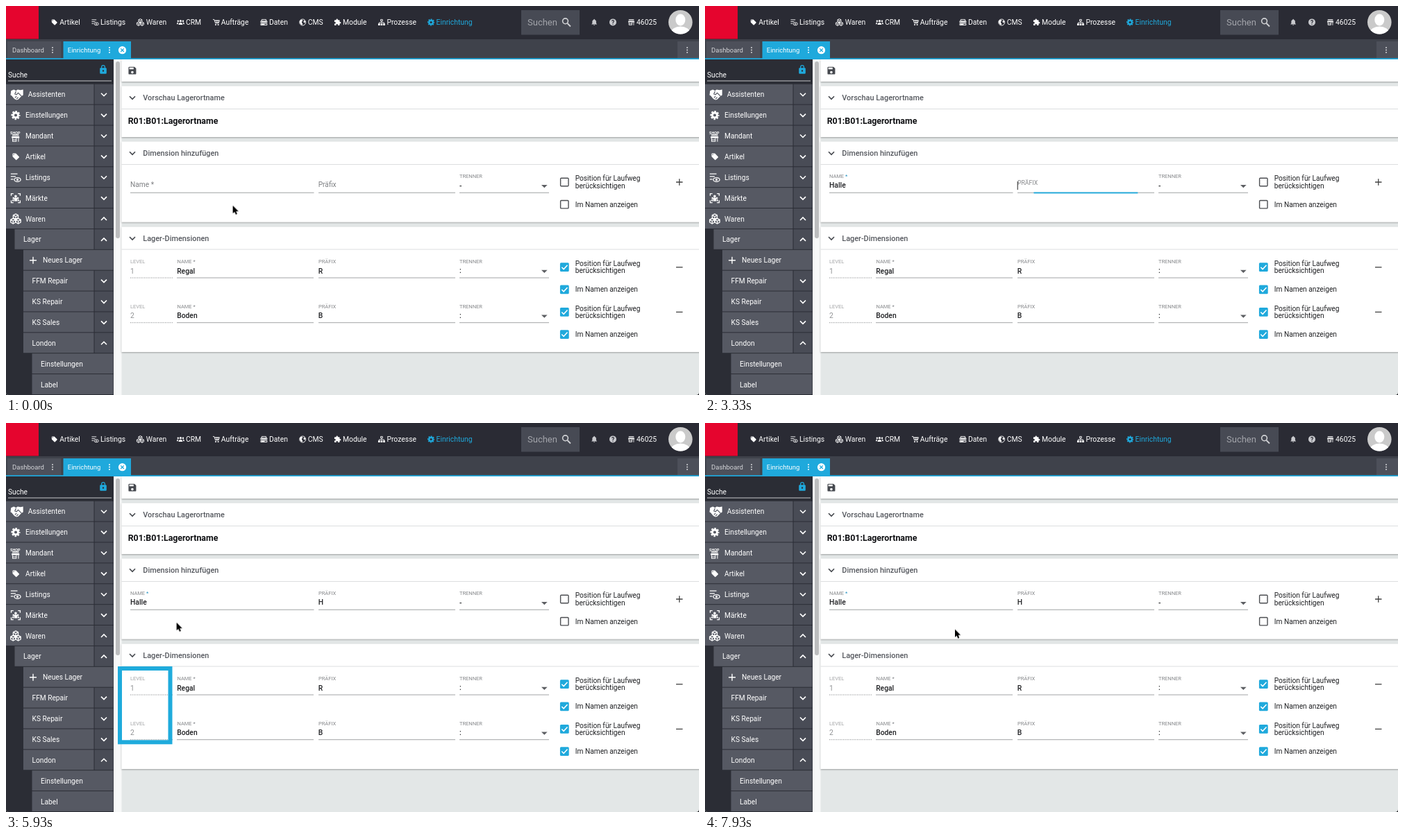
An HTML page that plays this animation: 998 by 561 pixels, repeating every 8000 ms.

```html
<!DOCTYPE html>
<html lang="de">
<head>
<meta charset="utf-8">
<title>Lager-Dimensionen</title>
<style>
html, body { margin: 0; width: 100%; height: 100%; overflow: hidden; background: #17181c; }
svg { position: absolute; left: 0; top: 0; display: block; }
#page { border-radius: 0 0 4px 4px; }
svg, .typed { font: 10.2px Roboto, sans-serif; }
.nav { font-size: 10.4px; fill: #fff; }
.tab { font-size: 9.5px; }
.title { font-size: 10.9px; font-weight: 500; fill: #55585e; }
.label { font-size: 7.5px; fill: #85878a; }
.hint { fill: #7d7f82; }
.value, .typed { font-size: 10.3px; font-weight: 500; }
.value, .opt { fill: #1f2023; }
.stroke { fill: none; stroke: currentColor; stroke-width: 2; }
.typed { position: absolute; top: 253px; height: 13px; line-height: 12px; overflow: hidden; white-space: nowrap; color: #1f2023; }

/* one loop is 8 s, so 1% is 80 ms */
.typed, .anim { animation: 8s linear infinite; }
.step { animation-timing-function: step-end; }
.label.anim { transform-box: fill-box; transform-origin: 0 50%; }
.line { fill: #1fa9dc; transform-box: fill-box; transform-origin: 50% 50%; }

.name-hint { animation-name: name-hint; }
.name-label { animation-name: name-label; }
.name-line { animation-name: name-line; }
.name-text { left: 179px; animation-name: name-text; animation-timing-function: step-end; }
.name-caret { animation-name: name-caret; }
.prefix-hint { animation-name: prefix-hint; }
.prefix-label { animation-name: prefix-label; }
.prefix-line { animation-name: prefix-line; }
.prefix-text { left: 449.7px; animation-name: prefix-text; animation-timing-function: step-end; }
.prefix-caret { animation-name: prefix-caret; }
.pointer { animation-name: pointer; }
.arrow { animation-name: arrow; }
.beam { animation-name: beam; }
.mark { animation-name: mark; }

@keyframes name-hint { 0% { opacity: 1 } 21.625%, to { opacity: 0 } }
@keyframes name-label {
  0%, 21.62% { opacity: 0; transform: translateY(10px) scale(1.16) }
  21.625% { opacity: 1; transform: translateY(10px) scale(1.16); fill: #85878a; animation-timing-function: ease-out }
  25.9%, 41.62% { opacity: 1; transform: none; fill: #5c8ea8 }
  41.625%, to { opacity: 1; transform: none; fill: #85878a }
}
@keyframes name-line {
  0%, 21.62% { transform: scaleX(0) }
  21.625% { transform: scaleX(.76) }
  23.4%, 41.62% { transform: none }
  41.625%, to { transform: scaleX(0) }
}
@keyframes name-text {
  0% { width: 0 }
  28.375% { width: 7.4px }
  30% { width: 13px }
  32.5% { width: 15.6px }
  33.375% { width: 18.2px }
  34.125%, to { width: 30px }
}
@keyframes name-caret {
  0% { opacity: 0; transform: none }
  21.625% { opacity: 1; transform: none }
  28.375% { opacity: 1; transform: translateX(7px) }
  30% { opacity: 1; transform: translateX(12.8px) }
  32.5% { opacity: 1; transform: translateX(15.4px) }
  33.375% { opacity: 1; transform: translateX(18px) }
  34.125% { opacity: 1; transform: translateX(23.3px) }
  39.125%, to { opacity: 0; transform: none }
}
@keyframes prefix-hint { 0% { opacity: 1 } 41.625%, to { opacity: 0 } }
@keyframes prefix-label {
  0%, 41.62% { opacity: 0; transform: translateY(9.7px) scale(1.16) }
  41.625% { opacity: 1; transform: translateY(9.7px) scale(1.16); fill: #85878a; animation-timing-function: ease-out }
  45.9%, 60.87% { opacity: 1; transform: none; fill: #5c8ea8 }
  60.875%, to { opacity: 1; transform: none; fill: #85878a }
}
@keyframes prefix-line {
  0%, 41.62% { transform: scaleX(0) }
  41.625% { transform: scaleX(.76) }
  43.4%, 60.87% { transform: none }
  60.875%, to { transform: scaleX(0) }
}
@keyframes prefix-text { 0% { width: 0 } 47.5%, to { width: 12px } }
@keyframes prefix-caret {
  0% { opacity: 0; transform: none }
  41.625% { opacity: 1; transform: none }
  47.5% { opacity: 1; transform: translateX(7.2px) }
  54.125%, to { opacity: 0; transform: none }
}
@keyframes pointer {
  0%, 4.2% { transform: translate(326.6px, 287.8px); animation-timing-function: ease-in-out }
  15% { transform: translate(251px, 264px); animation-timing-function: ease-out }
  17.5%, 51% { transform: translate(246px, 259.3px); animation-timing-function: ease-in-out }
  59.125%, 95% { transform: translate(245.6px, 287.8px); animation-timing-function: ease-in }
  99.125%, to { transform: translate(360px, 297.6px) }
}
@keyframes arrow { 0% { opacity: 1 } 15.875% { opacity: 0 } 55%, to { opacity: 1 } }
@keyframes beam {
  0% { opacity: 0 }
  15.875% { opacity: 1 }
  28.375% { opacity: 0 }
  51.625% { opacity: 1 }
  55%, to { opacity: 0 }
}
@keyframes mark {
  0%, 67.5% { opacity: 0 }
  74.125%, 87.5% { opacity: 1 }
  94.125%, to { opacity: 0 }
}
</style>
</head>
<body>
<svg id="page" width="998" height="561" viewBox="0 0 998 561">
  <defs>
    <filter id="shadow" x="-2%" y="-10%" width="104%" height="130%">
      <feDropShadow dx="0" dy="1" stdDeviation="1" flood-opacity=".32"/>
    </filter>
    <!-- icons on a 24 unit grid -->
    <path id="tag" fill-rule="evenodd" d="M21.4 11.6l-9-9C12 2.2 11.5 2 11 2H4a2 2 0 0 0-2 2v7c0 .5.2 1 .6 1.4l9 9c.8.8 2 .8 2.8 0l7-7c.8-.8.8-2 0-2.8zM5.5 7a1.5 1.5 0 1 1 0-3 1.5 1.5 0 0 1 0 3z"/>
    <g id="gear" fill="none" stroke="currentColor">
      <circle cx="12" cy="12" r="6" stroke-width="5"/>
      <circle cx="12" cy="12" r="9.3" stroke-width="4" stroke-dasharray="4.3 3" stroke-dashoffset="2.1"/>
    </g>
    <g id="list" class="stroke">
      <path d="M1 4h15M1 10h11M1 16h6"/>
      <ellipse cx="16" cy="17" rx="7" ry="4.5"/><circle cx="16" cy="17" r="1.4"/>
    </g>
    <path id="cube" class="stroke" d="M0-6l5.5 2.7v6L0 6l-5.5-3.3v-6zM-5.5-3.3L0 0l5.5-3.3M0 0v6"/>
    <g id="cubes"><use href="#cube" x="12" y="7"/><use href="#cube" x="6.3" y="17"/><use href="#cube" x="17.7" y="17"/></g>
    <g id="people">
      <circle cx="12" cy="8" r="3.6"/><circle cx="4" cy="8" r="2.7"/><circle cx="20" cy="8" r="2.7"/>
      <path d="M5.5 20c0-9 13-9 13 0zM0 18c0-6 3-6 5.5-5-2 2-2 3-2 5zM24 18c0-6-3-6-5.500-5 2 2 2 3 2 5z"/>
    </g>
    <g id="cart">
      <path class="stroke" d="M1 3h4l4 12h10l3-9H6M9 8h11M10 12h9"/>
      <circle cx="10" cy="20" r="2.2"/><circle cx="18" cy="20" r="2.2"/>
    </g>
    <g id="data"><path class="stroke" d="M5 8V3h14v5M2 8h20v5H2zM2 16h20v5H2z"/><path d="M4 9h16v3H4zM4 17h10v3H4z"/></g>
    <g id="globe"><circle class="stroke" cx="12" cy="12" r="10"/><path d="M3 7c5-6 9-3 9 0s-4 2-3 5 4 3 2 8C5 20 2 13 3 7zM16 5l5 5-3 5-3-4z"/></g>
    <path id="puzzle" d="M20.500 11H19V7a2 2 0 0 0-2-2h-4V3.500a2.500 2.500 0 0 0-5 0V5H4a2 2 0 0 0-2 2v3.800h1.500a2.700 2.700 0 0 1 0 5.400H2V20a2 2 0 0 0 2 2h3.800v-1.500a2.700 2.700 0 0 1 5.400 0V22H17a2 2 0 0 0 2-2v-4h1.500a2.500 2.500 0 0 0 0-5z"/>
    <g id="flow"><path class="stroke" d="M12 8v5M4 17v-4h16v4M9 3h6v5H9z"/><path d="M1 16h6v6H1zM9 16h6v6H9zM17 16h6v6h-6z"/></g>
    <g id="shop"><path d="M3 2h18v3H3zM2 7h20l1 5H1z"/><path class="stroke" d="M4 12v9h10v-9M20 12v10M4 17h10"/></g>
    <g id="people-box">
      <path class="stroke" d="M2 7V2h5M17 2h5v5M22 17v5h-5M7 22H2v-5"/>
      <circle cx="12" cy="7.500" r="2.800"/><circle cx="7" cy="12" r="2"/><circle cx="17" cy="12" r="2"/>
      <path d="M8.500 19v-6c0-3 7-3 7 0v6zM4.500 19c0-5 2-5 3-4v4zM19.500 19c0-5-2-5-3-4v4z"/>
    </g>
    <g id="hands">
      <path d="M1 5l5-2 4 2 3-2 5 1 5-1v10l-3 2-6 6-3 1-4-2-5-6-2-1z"/>
      <path d="M10 6l-2 5 3 1 3-3 6 6M8 18l3-3M11 20l3-3" fill="none" stroke="#565963" stroke-width="1.500"/>
    </g>
    <path id="save" fill-rule="evenodd" d="M17 3H5a2 2 0 0 0-2 2v14a2 2 0 0 0 2 2h14a2 2 0 0 0 2-2V7zM12 19a3 3 0 1 1 0-6 3 3 0 0 1 0 6zm3-10H5V5h10z"/>
    <path id="bell" d="M12 22a2 2 0 0 0 2-2h-4a2 2 0 0 0 2 2zm6-6v-5c0-3-1.600-5.600-4.500-6.300V4a1.500 1.500 0 0 0-3 0v.7C7.600 5.400 6 8 6 11v5l-2 2v1h16v-1z"/>
    <path id="lock" fill-rule="evenodd" d="M18 8h-1V6A5 5 0 0 0 7 6v2H6a2 2 0 0 0-2 2v10a2 2 0 0 0 2 2h12a2 2 0 0 0 2-2V10a2 2 0 0 0-2-2zm-6 9a2 2 0 1 1 0-4 2 2 0 0 1 0 4zm3-9H9V6a3 3 0 0 1 6 0z"/>
    <!-- small parts around their own centre -->
    <path id="down" fill="none" stroke="currentColor" stroke-width="1.600" d="M-4-2L0 2l4-4"/>
    <path id="up" fill="none" stroke="currentColor" stroke-width="1.600" d="M-4 2L0-2l4 4"/>
    <g id="dots" fill="currentColor"><circle cy="-3.600" r="1"/><circle r="1"/><circle cy="3.600" r="1"/></g>
    <rect id="box" x="-5.700" y="-5.700" width="11.400" height="11.400" rx="1" fill="#fff" stroke="#4c4e52" stroke-width="1.400"/>
    <g id="checked"><rect x="-6.400" y="-6.400" width="12.800" height="12.800" rx="1.500" fill="#1fa9dc"/><path d="M-4 0l2.800 2.900L4.200-3" fill="none" stroke="#fff" stroke-width="1.500"/></g>
    <!-- parts shared by every form row; y counts from the label centre -->
    <g id="options">
      <text class="label" x="653" y="2.700">TRENNER</text>
      <path d="M450 23.800h197M653 23.800h129" stroke="#a2a4a6"/>
      <path d="M771 12.500h8.600l-4.300 4.300z" fill="#5d5f63"/>
      <g class="opt"><text x="819.700" y="6.800">Position für Laufweg</text><text x="819.700" y="17.300">berücksichtigen</text><text x="819.700" y="44.300">Im Namen anzeigen</text></g>
    </g>
    <g id="dimension">
      <use href="#options"/>
      <g class="label"><text x="179" y="2.700" fill-opacity=".75">LEVEL</text><text x="246.500" y="2.700">NAME *</text><text x="450" y="2.700">PRÄFIX</text></g>
      <path d="M246 23.800h197" stroke="#a2a4a6"/>
      <path d="M179 23.800h61" stroke="#8c8e90" stroke-dasharray="1.200 1.300"/>
      <text class="value" x="653" y="17">:</text>
      <use href="#checked" x="804.300" y="8.500"/><use href="#checked" x="804.300" y="40.700"/>
      <path d="M965 8.500h9.500" stroke="#444" stroke-width="1.300"/>
    </g>
  </defs>

  <rect width="998" height="561" fill="#e3e7e7"/>
  <!-- header -->
  <rect width="998" height="48" fill="#2a2b34"/>
  <rect width="47" height="47.500" fill="#e5052e"/>
  <g id="nav" class="nav"></g>
  <rect x="742" y="6" width="84" height="35.500" fill="#474a54"/>
  <text x="751" y="28" font-size="13" fill="#a3a5ab">Suchen</text>
  <path d="M808.500 25l4.500 4.500" stroke="#d0d1d4" stroke-width="1.800"/>
  <circle cx="805.500" cy="21.800" r="3.900" fill="none" stroke="#d0d1d4" stroke-width="1.600"/>
  <use href="#bell" transform="translate(841.500 17.500) scale(.47)" fill="#c9cace"/>
  <circle cx="874" cy="23.400" r="5" fill="#c9cace"/>
  <text x="874" y="26.500" font-size="8.500" font-weight="700" text-anchor="middle" fill="#2a2b34">?</text>
  <use href="#shop" transform="translate(895.500 18.500) scale(.42)" fill="#fff" color="#fff"/>
  <text class="nav" x="908" y="27.200">46025</text>
  <clipPath id="round"><circle cx="971.300" cy="23.300" r="17.300"/></clipPath>
  <g clip-path="url(#round)">
    <rect x="954" y="6" width="35" height="35" fill="#cacaca"/>
    <ellipse cx="971.300" cy="20" rx="7" ry="8.500" fill="#fff"/>
    <ellipse cx="971.300" cy="39" rx="14" ry="9.500" fill="#fff"/>
  </g>

  <!-- tabs -->
  <rect y="48" width="998" height="28" fill="#3f424b"/>
  <rect x="2" y="51" width="77.500" height="24.500" fill="#4d505a"/>
  <text class="tab" x="9" y="66.500" fill="#d3d4d7">Dashboard</text>
  <use href="#dots" x="67" y="63.500" color="#d3d4d7"/>
  <rect x="82.500" y="51" width="97.500" height="26" fill="#1fa9dc"/>
  <text class="tab" x="88.800" y="66.500" fill="#fff">Einrichtung</text>
  <use href="#dots" x="149" y="63.500" color="#fff"/>
  <circle cx="167.500" cy="63.700" r="5.600" fill="#fff"/>
  <path d="M165.200 61.400l4.600 4.600m0-4.600l-4.600 4.600" stroke="#1fa9dc" stroke-width="1.300"/>
  <rect x="967" y="51" width="31" height="24.500" fill="#4d505a"/>
  <use href="#dots" x="981" y="63.500" color="#d3d4d7"/>

  <!-- sidebar -->
  <rect y="77" width="155" height="484" fill="#2b2d35"/>
  <text x="3" y="102.700" fill="#fff">Suche</text>
  <path d="M3 108h149" stroke="#c6c7ca"/>
  <use href="#lock" transform="translate(132.800 84.500) scale(.6)" fill="#1fa9dc"/>
  <g id="side" fill="#fff" color="#fff"></g>
  <rect x="155" y="77" width="11.500" height="484" fill="#f7f8f8"/>
  <rect x="158" y="80" width="6" height="255" rx="3" fill="#bcbdbe"/>

  <!-- cards -->
  <g fill="#fff" filter="url(#shadow)">
    <rect x="166.500" y="77" width="840" height="32"/>
    <rect x="166.500" y="115.500" width="840" height="73.500"/>
    <rect x="166.500" y="195.500" width="840" height="116"/>
    <rect x="166.500" y="318.500" width="840" height="180.500"/>
  </g>
  <path d="M0 76.200h998" stroke="#1fa9dc" stroke-width="1.800"/>
  <path d="M166.500 148.500h832m-832 80h832m-832 122.500h832" stroke="#dcdedf"/>
  <use href="#save" transform="translate(174.600 85.800) scale(.61)" fill="#45484e"/>
  <g class="title" color="#45484e">
    <use href="#down" x="182" y="132.300"/><text x="197.300" y="135.800">Vorschau Lagerortname</text>
    <use href="#down" x="182" y="212.300"/><text x="197.300" y="215.800">Dimension hinzufügen</text>
    <use href="#down" x="182" y="335"/><text x="197.300" y="338.500">Lager-Dimensionen</text>
  </g>
  <text x="175.700" y="169.800" font-size="12.400" font-weight="700" fill="#101114">R01:B01:Lagerortname</text>

  <!-- new dimension -->
  <use href="#options" y="245.500"/>
  <path d="M179 269.300h264.500" stroke="#a2a4a6"/>
  <text class="value" x="653" y="262.500">-</text>
  <use href="#box" x="804.300" y="254"/><use href="#box" x="804.300" y="286.200"/>
  <path d="M965 254h9.500m-4.750-4.750v9.500" stroke="#444" stroke-width="1.300"/>

  <!-- existing dimensions -->
  <use href="#dimension" y="368.200"/>
  <use href="#dimension" y="432.900"/>
  <g class="value">
    <text x="246.200" y="385.500">Regal</text><text x="449.700" y="385.500">R</text>
    <text x="246.200" y="450.200">Boden</text><text x="449.700" y="450.200">B</text>
  </g>
  <text x="179" y="385.500" fill="#8f9193">1</text>
  <text x="179" y="450.200" fill="#8f9193">2</text>

  <!-- input states -->
  <text class="hint anim step name-hint" x="179" y="261">Name *</text>
  <text class="label anim name-label" x="179" y="248.200">NAME <tspan fill="#1f8fc0">*</tspan></text>
  <rect class="line anim name-line" x="179" y="268.500" width="264.500" height="1.900"/>
  <text class="hint anim step prefix-hint" x="449.700" y="261">Präfix</text>
  <text class="label anim prefix-label" x="450" y="248.200">PRÄFIX</text>
  <rect class="line anim prefix-line" x="450" y="268.500" width="197" height="1.900"/>
</svg>

<span class="typed name-text">Halle</span>
<span class="typed prefix-text">H</span>

<svg width="998" height="561" viewBox="0 0 998 561">
  <rect class="anim step name-caret" x="179" y="253" width="1" height="12" fill="#222"/>
  <rect class="anim step prefix-caret" x="449.700" y="253" width="1" height="12" fill="#222"/>
  <rect class="anim mark" x="164" y="354" width="72.500" height="106.300" fill="none" stroke="#1fabdc" stroke-width="6"/>
  <g class="anim pointer">
    <path class="anim step arrow" d="M0 0v11.300l2.600-2.400 1.700 4 2-.8-1.700-3.900h3.600z" fill="#000" stroke="#fff" stroke-width=".9" paint-order="stroke"/>
    <path class="anim step beam" d="M-2.500-6.500Q0-6.500 0-4.500V4.500Q0 6.500-2.500 6.500M2.500-6.500Q0-6.500 0-4.500M0 4.500Q0 6.500 2.500 6.500" fill="none" stroke="#222"/>
  </g>
</svg>

<script>
const icon = (id, x, y, size) =>
  `<use href="#${id}" transform="translate(${x} ${y - size / 2}) scale(${size / 24})"/>`;
const text = (x, y, s) => `<text x="${x}" y="${y}">${s}</text>`;

// icon, icon x, label
const nav = [
  ['tag', 65, 'Artikel'], ['list', 123, 'Listings'], ['cubes', 188, 'Waren'],
  ['people', 246, 'CRM'], ['cart', 297.500, 'Aufträge'], ['data', 366, 'Daten'],
  ['globe', 421.800, 'CMS'], ['puzzle', 472, 'Module'], ['flow', 535.500, 'Prozesse'],
  ['gear', 606.700, 'Einrichtung']
];
document.getElementById('nav').innerHTML = nav.map(([id, x, s], i) => {
  const color = i === nav.length - 1 ? '#1fa9dc' : '#fff';
  const size = id === 'tag' ? 9.500 : 10.800;
  const gap = id === 'cubes' ? 13.800 : id === 'tag' || id === 'cart' ? 12.200 : 12.900;
  return `<g fill="${color}" color="${color}">${icon(id, x, 23.500, size)}${text(x + gap, 27.200, s)}</g>`;
}).join('');

// label, depth, chevron, icon
const side = [
  ['Assistenten', 0, 'down', 'hands'], ['Einstellungen', 0, 'down', 'gear'],
  ['Mandant', 0, 'down', 'shop'], ['Artikel', 0, 'down', 'tag'],
  ['Listings', 0, 'down', 'list'], ['Märkte', 0, 'down', 'people-box'],
  ['Waren', 0, 'up', 'cubes'], ['Lager', 1, 'up'], ['Neues Lager', 2],
  ['FFM Repair', 2, 'down'], ['KS Repair', 2, 'down'], ['KS Sales', 2, 'down'],
  ['London', 2, 'up'], ['Einstellungen', 3], ['Label', 3]
];
const step = 29.880;
const sideIcon = (id, y) => {
  if (id === 'hands') return icon(id, 6.500, y, 19);
  if (id === 'tag') return icon(id, 8.500, y, 11.500);
  if (id === 'shop') return `<text x="6" y="${y - 2.500}" font-size="5.500" font-weight="700">SHOP</text>` + icon(id, 7.500, y + 3, 12.500);
  return icon(id, id === 'gear' ? 7 : 6.200, y, id === 'gear' ? 14 : 15.500);
};
document.getElementById('side').innerHTML = side.map(([s, depth, chevron, id], i) => {
  const y = 127.700 + step * i;
  const top = y - step / 2;
  const left = depth * 12.500;
  const right = chevron ? 126.500 : 154.500;
  const isNew = s === 'Neues Lager';
  const x = id === 'hands' ? 31.700 : id ? 28 : isNew ? 53 : left + 12.500;
  let out = `<rect x="${left}" y="${top}" width="${right - left}" height="${step - 1}" fill="#565963"/>`;
  if (chevron) out += `<rect x="127.500" y="${top}" width="27" height="${step - 1}" fill="#494c56"/><use href="#${chevron}" x="141" y="${y}"/>`;
  if (id) out += sideIcon(id, y);
  if (isNew) out += `<path d="M34 ${y}h10m-5-5v10" stroke="#fff" stroke-width="1.400"/>`;
  return out + text(x, y + 3.600, s);
}).join('');
</script>
</body>
</html>
```
